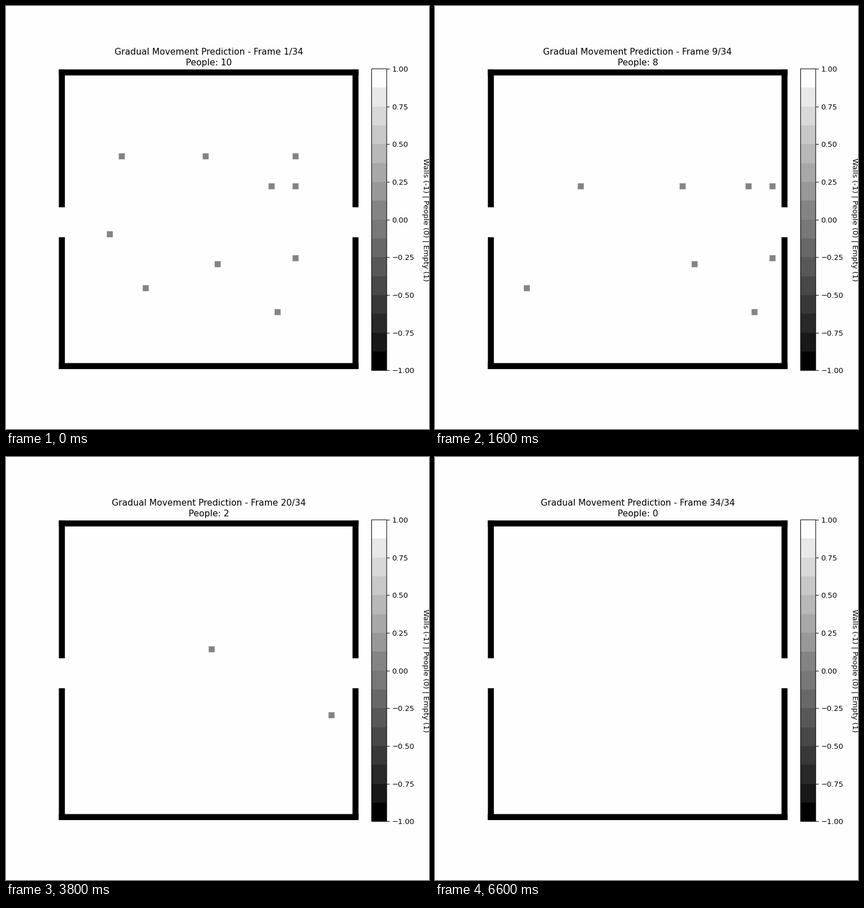
A matplotlib script that plays this animation: 748x748 px, repeating every 6.8 s.

```python
import math
import numpy as np
import matplotlib.pyplot as plt
from matplotlib.animation import FuncAnimation
from matplotlib.cm import ScalarMappable
from matplotlib.collections import PolyCollection
from matplotlib.colors import ListedColormap, Normalize

SIZE = 50
STEPS = 34
DOOR_ROW = 24
LEFT_DOOR, RIGHT_DOOR = -2, SIZE + 1
STRIDE = 2
RISE = 0.06  # room sits a fraction of a cell above the centre
PERSON_GRAY = 132 / 255

# Column and row of people who walk straight to the nearer side.
STRAIGHT = [(39, 19), (8, 27), (26, 32), (39, 31), (14, 36), (36, 40)]

# People who wander through (column, row) points every 4 steps, then seek a door.
SEEKERS = [
    (LEFT_DOOR, [(10, 14)]),
    (LEFT_DOOR, [(24, 14), (22, 16), (15, 19)]),
    (LEFT_DOOR, [(35, 19), (39, 19), (32, 19), (39, 21)]),
    (RIGHT_DOOR, [(39, 14), (36, 16), (43, 19)]),
]


def straight_track(col, row):
    pace = 1 if col > SIZE / 2 else -1
    return [(col + pace * step, row) for step in range(STEPS)]


def seeker_track(door, points):
    cols, rows = zip(*points)
    times = 4 * np.arange(len(points))
    track = [(round(np.interp(step, times, cols)),
              round(np.interp(step, times, rows)))
             for step in range(times[-1] + 1)]
    while len(track) < STEPS:
        col, row = track[-1]
        dx, dy = door - col, DOOR_ROW - row
        scale = STRIDE / max(math.hypot(dx, dy), STRIDE)
        track.append((col + round(dx * scale), row + round(dy * scale)))
    return track


def until_exit(track):
    for step, (col, _) in enumerate(track):
        if not 1 < col < SIZE - 2:
            return track[:step]
    return track


TRACKS = [until_exit(straight_track(*start)) for start in STRAIGHT]
TRACKS += [until_exit(seeker_track(*seeker)) for seeker in SEEKERS]


def box(x, y, w=1, h=1):
    return [(x, y), (x + w, y), (x + w, y + h), (x, y + h)]


def add_boxes(boxes, color):
    group = PolyCollection(boxes, facecolors=color, edgecolors="none",
                           linewidths=0, snap=False, clip_on=False)
    ax.add_collection(group, autolim=False)
    return group


def gray_bands():
    levels = (np.arange(16) * 16 + 8) / 255
    levels[0], levels[8], levels[-1] = 0, PERSON_GRAY, 254 / 255
    return ListedColormap([(v, v, v) for v in levels])


plt.rcParams["font.family"] = "DejaVu Sans"
fig, ax = plt.subplots(figsize=(8, 8), dpi=93.5, facecolor="#fefefe")
ax.set(xlim=(0, SIZE), ylim=(SIZE + RISE, RISE), aspect="equal")
ax.axis("off")

walls = [box(0, y, w=SIZE) for y in (0, SIZE - 1)]
walls += [box(x, y, h=h) for x in (0, SIZE - 1) for y, h in ((0, 23), (28, 22))]
add_boxes(walls, "black")
people = add_boxes([], str(PERSON_GRAY))

bar = fig.colorbar(ScalarMappable(Normalize(-1, 1), gray_bands()), ax=ax,
                   fraction=0.046, pad=0.04, ticks=np.linspace(-1, 1, 9))
bar.set_label("Walls (-1) | People (0) | Empty (1)", rotation=270, labelpad=20)
bar.outline.set_snap(False)
title = ax.set_title("", fontsize=11.9, linespacing=1.27, pad=6.4)


def draw(step):
    cells = [track[step] for track in TRACKS if step < len(track)]
    people.set_verts([box(*cell) for cell in cells])
    title.set_text(f"Gradual Movement Prediction - Frame {step + 1}/{STEPS}\n"
                   f"People: {len(cells)}")
    return people, title


anim = FuncAnimation(fig, draw, frames=STEPS, interval=200, repeat=True,
                     repeat_delay=0, blit=False)
plt.show()
```
